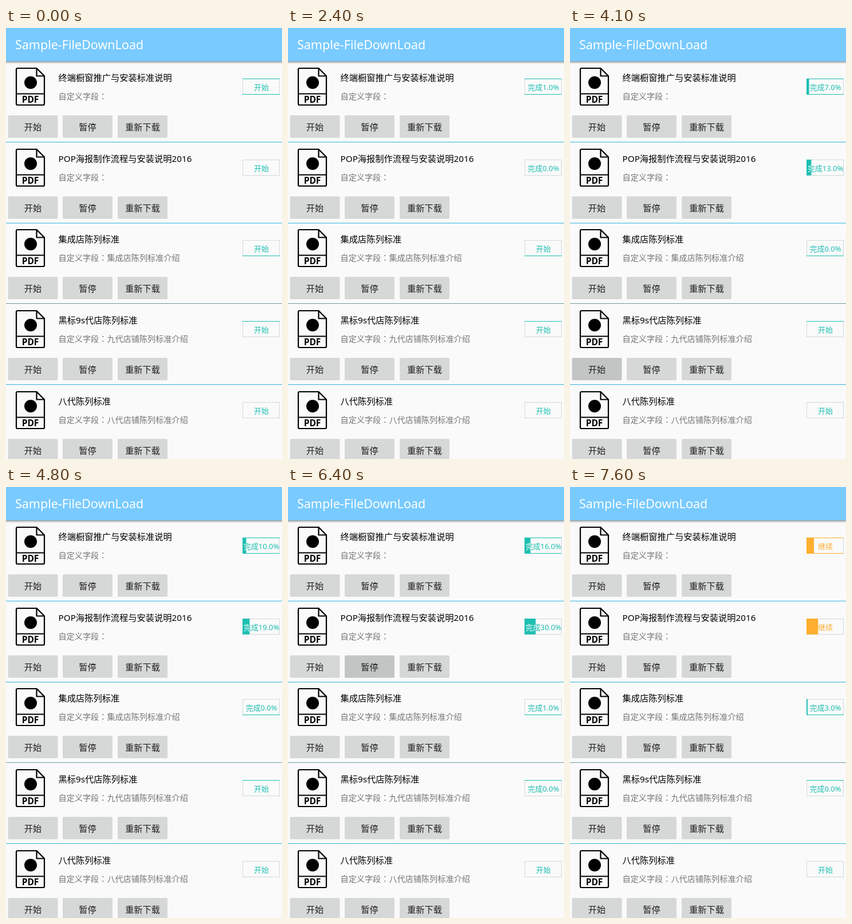
Animation, 482 px wide and 750 px high, one loop 8000 ms. Source, as an HTML page with a canvas:

```html
<!DOCTYPE html>
<html lang="zh-CN">
<head>
<meta charset="utf-8">
<title>Sample-FileDownLoad</title>
<style>
html, body { margin: 0; width: 100%; height: 100%; overflow: hidden; background: #fafafa; }
canvas { display: block; }
</style>
</head>
<body>
<canvas id="stage" width="482" height="750"></canvas>
<script>
const ctx = document.getElementById('stage').getContext('2d');
const LOOP = 8000, PITCH = 140.7;
const TEAL = '#1fbfb2', ORANGE = '#ffae2f', PALE = '#d2d9d8';
const SANS = '"Noto Sans", "Noto Sans CJK SC", "Noto Sans CJK", sans-serif';
const CENTERED = '"Noto Sans CJK TC", "Noto Sans CJK SC", sans-serif';

// ticks: when each whole percent is reached, in tenths of a second
// press: [button index, from, to]; top / bottom: border line at full strength
const rows = [
  { name: '终端橱窗推广与安装标准说明', note: '', top: 1, bottom: 1, line: '#33b5e0',
    ticks: [16, 24, 26, 29, 31, 33, 36, 39, 42, 45, 48, 50, 53, 55, 58, 61, 64, 67, 69, 71, 73],
    pause: 74, press: [0, 13, 14] },
  { name: 'POP海报制作流程与安装说明2016', note: '', line: '#33b5e0',
    ticks: [24, 25, 29, 30, 32, 33, 35, 35, 36, 37, 38, 39, 39, 41, 42, 43, 45, 45, 48, 48,
            50, 50, 51, 53, 54, 56, 58, 58, 61, 63, 64, 65],
    pause: 66, press: [1, 63, 65] },
  { name: '集成店陈列标准', note: '集成店陈列标准介绍', bottom: 1, line: '#6f9a9e',
    ticks: [37, 54, 65, 76], press: [0, 30, 32] },
  { name: '黑标9s代店陈列标准', note: '九代店铺陈列标准介绍', top: 1, line: '#33b5e0',
    ticks: [55], press: [0, 41, 43] },
  { name: '八代陈列标准', note: '八代店铺陈列标准介绍', line: '#33b5e0', ticks: [] }
];
const buttons = [['开始', 3.5], ['暂停', 99], ['重新下载', 195]];

function rect(x, y, w, h, color) {
  ctx.fillStyle = color;
  ctx.fillRect(x, y, w, h);
}

function text(str, x, y, size, color, align = 'left', family = SANS, weight = 400) {
  ctx.font = `${weight} ${size}px ${family}`;
  ctx.textAlign = align;
  ctx.fillStyle = color;
  ctx.fillText(str, x, y);
}

function drawHeader() {
  const shade = ctx.createLinearGradient(0, 58, 0, 63);
  shade.addColorStop(0, '#8a8f92');
  shade.addColorStop(0.4, '#cfd0d1');
  shade.addColorStop(1, '#fafafa');
  rect(0, 58, 482, 5, shade);
  rect(0, 0, 482, 58, '#78caff');
  text('Sample-FileDownLoad', 16, 36.5, 21.5, '#fff');
}

function drawIcon(y) {
  ctx.strokeStyle = '#000';
  ctx.lineWidth = 2.2;
  ctx.lineJoin = 'round';
  ctx.beginPath();
  ctx.moveTo(53.5, y + 1);
  ctx.lineTo(20, y + 1);
  ctx.quadraticCurveTo(18, y + 1, 18, y + 3);
  ctx.lineTo(18, y + 63);
  ctx.quadraticCurveTo(18, y + 65, 20, y + 65);
  ctx.lineTo(65, y + 65);
  ctx.quadraticCurveTo(67, y + 65, 67, y + 63);
  ctx.lineTo(67, y + 14.5);
  ctx.lineTo(53.5, y + 1);
  ctx.lineTo(53.5, y + 14.5);
  ctx.lineTo(67, y + 14.5);
  ctx.moveTo(18, y + 45.5);
  ctx.lineTo(67, y + 45.5);
  ctx.stroke();
  ctx.fillStyle = '#000';
  ctx.beginPath();
  ctx.arc(43, y + 26, 11, 0, Math.PI * 2);
  ctx.fill();
  text('PDF', 42.5, y + 61.3, 15.5, '#000', 'center', SANS, 600);
}

function drawButton(label, x, y, pressed) {
  ctx.fillStyle = pressed ? '#c3c5c5' : '#d6d7d7';
  ctx.beginPath();
  ctx.roundRect(x, y, 87, 39, 2);
  ctx.fill();
  text(label, x + 43.5, y + 26.2, 15.2, '#1f1f1f', 'center');
}

function drawProgress(row, y, tick) {
  const percent = row.ticks.filter(t => t <= tick).length - 1;
  const paused = tick >= row.pause;
  const color = paused ? ORANGE : TEAL;
  const label = paused ? '继续' : percent < 0 ? '开始' : `完成${percent}.0%`;
  const x = 413, w = 65, mid = x + w / 2 + 0.5;
  const fill = percent > 1 ? w * percent / 100 : 0;

  rect(x, y, 1, 28, PALE);
  rect(x + w - 1, y, 1, 28, PALE);
  rect(x, y, w, 1, row.top ? color : PALE);
  rect(x, y + 27, w, 1, row.bottom ? color : PALE);
  text(label, mid, y + 20, 13, color, 'center');
  if (!fill) return;
  rect(x, y, fill, 27.5, color);
  ctx.save();
  ctx.beginPath();
  ctx.rect(x, y, fill, 28);
  ctx.clip();
  text(label, mid, y + 20, 13, '#fff', 'center');
  ctx.restore();
}

function drawRow(row, i, tick) {
  const y = Math.round(PITCH * i);
  const [key, from, to] = row.press || [-1, 0, 0];
  drawIcon(y + 69);
  text(row.name, 91.5, y + 92, 15.25, '#000');
  text('自定义字段', 91.5, y + 124, 14.15, '#757575');
  text('：', 162.3, y + 124, 14.15, '#757575', 'left', CENTERED);
  text(row.note, 176.4, y + 124, 14.15, '#757575');
  buttons.forEach(([label, x], b) =>
    drawButton(label, x, y + 152, b === key && tick >= from && tick < to));
  drawProgress(row, y + 88, tick);
  rect(0, y + 198, 482, 1, row.line);
}

function frame() {
  const tick = Math.floor(performance.now() % LOOP / 100);
  rect(0, 0, 482, 750, '#fafafa');
  drawHeader();
  rows.forEach((row, i) => drawRow(row, i, tick));
  requestAnimationFrame(frame);
}
frame();
</script>
</body>
</html>
```
